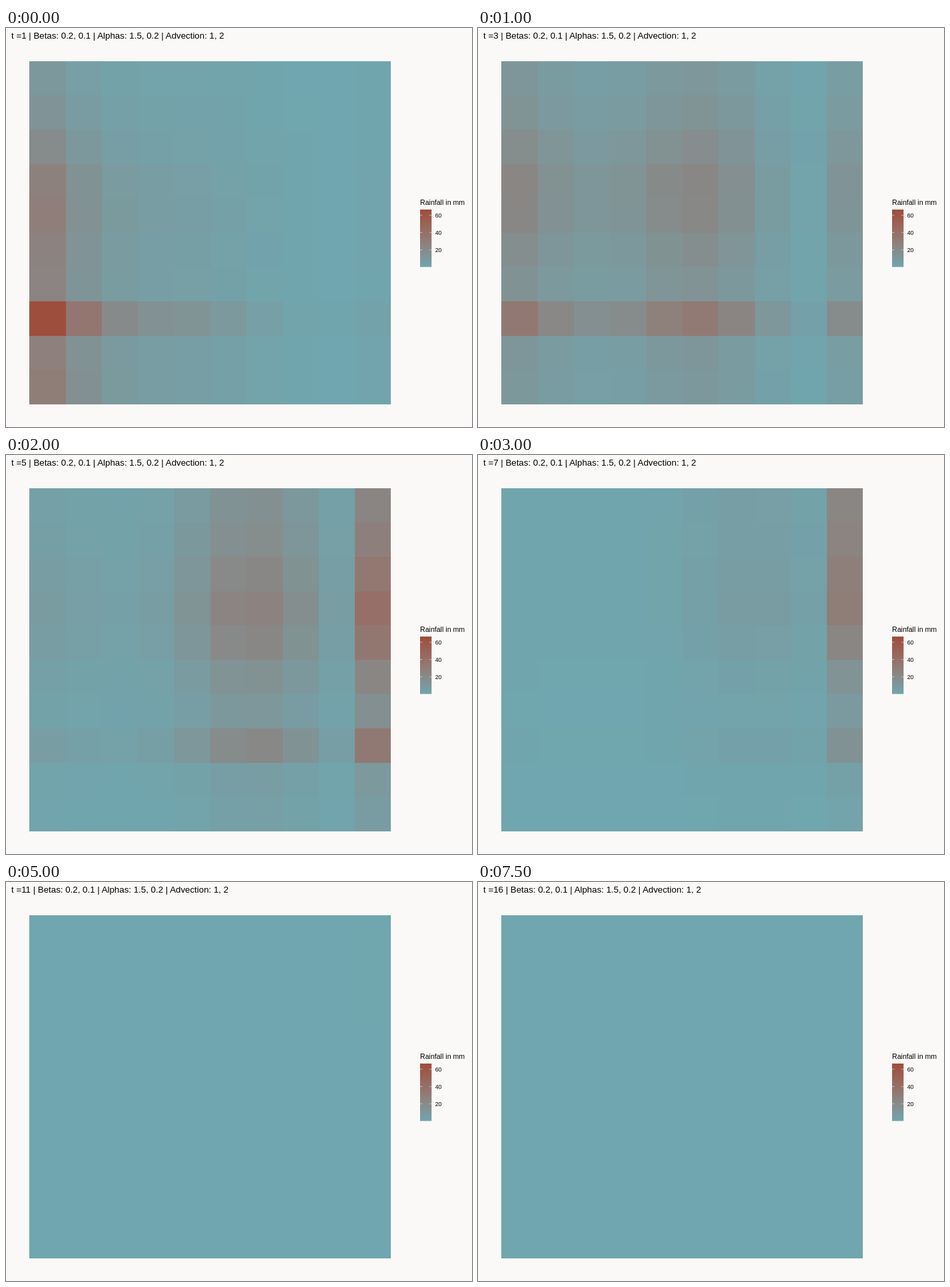
Animation of 700 by 600 pixels, one loop 8000 ms. Source, as an HTML page:

```html
<!DOCTYPE html>
<html lang="en">
<head>
<meta charset="utf-8">
<title>Rainfall grid</title>
<style>
  html, body { margin: 0; width: 100%; height: 100%; overflow: hidden; background: #faf9f7; }
  svg { display: block; width: 700px; height: 600px; font-family: "Liberation Sans", Arial, sans-serif; }
</style>
</head>
<body>
<svg viewBox="0 0 700 600">
  <defs><linearGradient id="scale" x1="0" y1="1" x2="0" y2="0"></linearGradient></defs>
  <text id="title" x="8" y="15.5" font-size="13.3"></text>
  <g id="grid" shape-rendering="crispEdges"></g>
  <text x="622" y="266" font-size="10.6">Rainfall in mm</text>
  <rect x="622" y="273" width="17.3" height="86.4" fill="url(#scale)"/>
  <g id="ticks" font-size="8.8"></g>
</svg>
<script>
const STEP = 500, STEPS = 16, N = 10, MAX = 66.5;
const $ = id => document.getElementById(id);
const bump = (x, centre, width) => Math.exp(-(((x - centre) / width) ** 2));

// A rise down the grid, a soft band and one wet row; the weight drifts upwards with age.
function rowWeight(r, age) {
  const base = .15 + .033 * r + .17 * bump(r, 3.5, 1.6) + .62 * bump(r, 7, .4);
  const drift = .0042 * age * (10.2 ** 2 - (r + 3.2) ** 2);
  return base * Math.exp(drift);
}

// Rain leaves the left edge, crosses the middle and gathers at the right edge.
function columnRain(c, age) {
  const start = 66 * Math.exp(-.2 * age ** 1.8 - c / (1.5 + .4 * age));
  const middle = 30 * bump(age, 2.6, 2.3) * bump(c, 4.2 + .38 * age, 1.9);
  const end = 31 * bump(age, 3.8, 2.4) * bump(c, N - 1, .4);
  return start + middle + end;
}

const rainfall = (r, c, age) => rowWeight(r, age) * columnRain(c, age);

// Teal to rust, with a bend that follows a perceptual blend.
function colour(mm) {
  const f = Math.min(1, mm / MAX), bend = f * (1 - f);
  const mix = (a, b, k) => Math.round(a + (b - a) * f + k * bend);
  return `rgb(${mix(112, 158, 44)},${mix(166, 78, -8)},${mix(175, 60, -16)})`;
}

function add(parent, tag, attrs, text = "") {
  const el = document.createElementNS("http://www.w3.org/2000/svg", tag);
  for (const key in attrs) el.setAttribute(key, attrs[key]);
  el.textContent = text;
  return parent.appendChild(el);
}

const xAt = c => Math.ceil(35 + 543 * c / N);
const yAt = r => Math.round(49.7 + 51.6 * r);
const cells = [];
for (let r = 0; r < N; r++) {
  for (let c = 0; c < N; c++) {
    const x = xAt(c), y = yAt(r);
    const el = add($("grid"), "rect", { x, y, width: xAt(c + 1) - x, height: yAt(r + 1) - y });
    cells.push({ el, r, c });
  }
}

for (let i = 0; i <= 10; i++)
  add($("scale"), "stop", { offset: i / 10, "stop-color": colour(MAX * i / 10) });

for (let mm = 20; mm <= 60; mm += 20) {
  const y = 359.6 - mm * 1.3;
  add($("ticks"), "path", { d: `M622 ${y}h3.4M635.9 ${y}h3.4`, stroke: "#fff", "stroke-width": .5 });
  add($("ticks"), "text", { x: 644.7, y: y + 3.2 }, mm);
}

let shown = -1;
function draw(now) {
  const age = Math.floor(now / STEP) % STEPS;
  if (age !== shown) {
    shown = age;
    $("title").textContent = `t =${age + 1} | Betas: 0.2, 0.1 | Alphas: 1.5, 0.2 | Advection: 1, 2`;
    for (const { el, r, c } of cells) el.setAttribute("fill", colour(rainfall(r, c, age)));
  }
  requestAnimationFrame(draw);
}
draw(performance.now());
</script>
</body>
</html>
```
